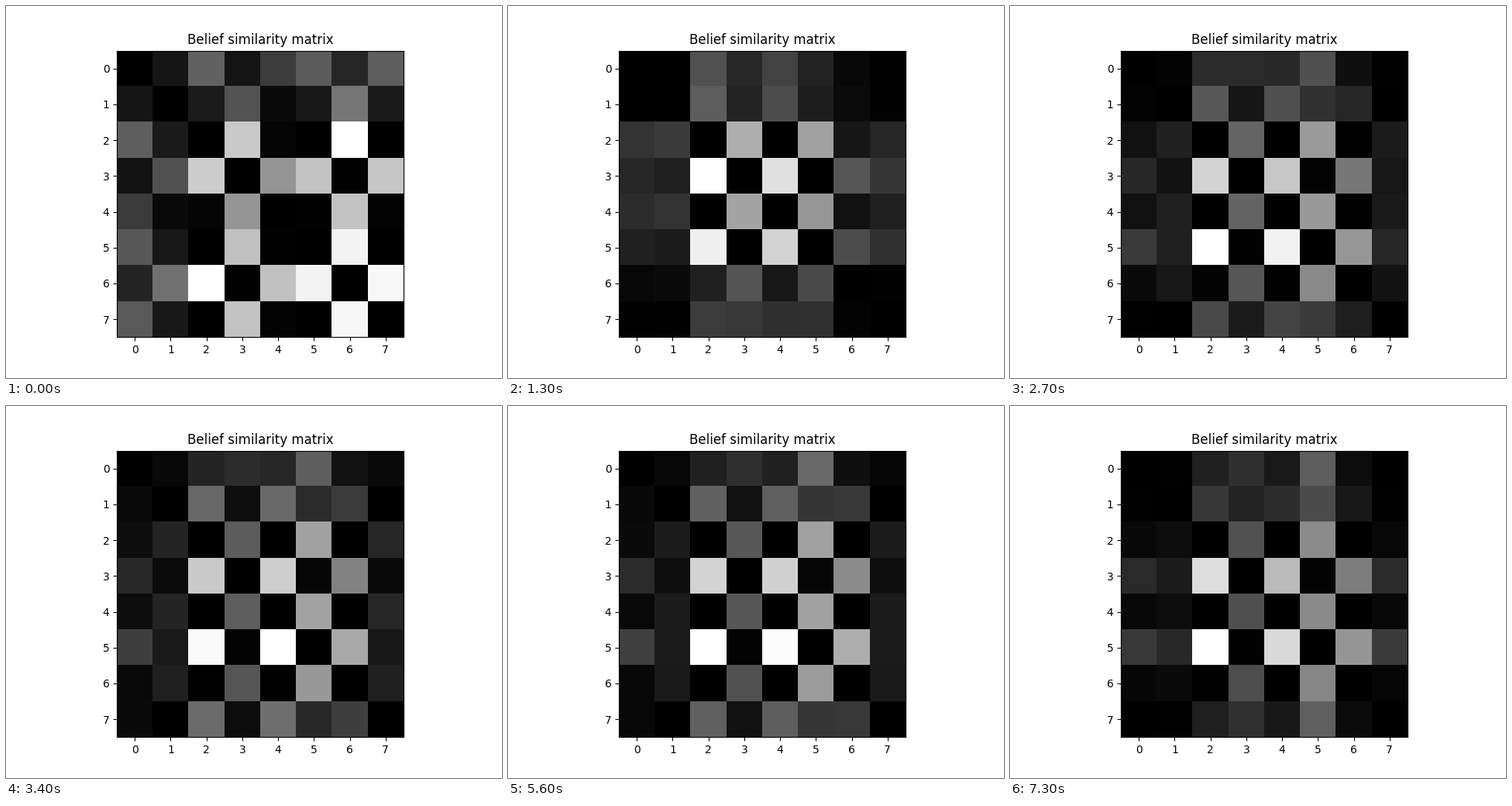
A matplotlib script for the animation above (7400 ms loop, 640 px wide and 480 px high).

```python
import numpy as np
import matplotlib.pyplot as plt
from matplotlib.animation import FuncAnimation

FRAMES = 74
PAUSE = 47      # step that is held for one extra frame
PERIOD = 26     # steps per swing of the undecided agents

# Log-odds of the eight agents: where they begin, where they settle,
# and how strongly they swing on the way
START = np.array([-.13, .26, .71, -.51, .53, .68, -.66, .69])
SETTLE = np.array([1.38, .40, 6.42, -1.89, 5.95, -3.63, 4.13, .65])
SWING = np.array([.04, .47, .58, -.12, 0, 0, 0, .83])


def beliefs_at(frame):
    step = frame - (frame > PAUSE)
    ease = 1 - np.exp(-(step / 22) ** 1.5)
    sway = -np.sin(2 * np.pi * step / PERIOD)
    x = START + (SETTLE - START) * ease + SWING * sway
    return 1 / (1 + np.exp(-x))


def divergence(b):
    """Pairwise KL divergence of binary beliefs, scaled to a maximum of 1."""
    p, q = b[:, None], b[None, :]
    d = p * np.log(p / q) + (1 - p) * np.log((1 - p) / (1 - q))
    return d / d.max()


fig, ax = plt.subplots(figsize=(6.4, 4.8), dpi=100)
image = ax.imshow(divergence(beliefs_at(0)), cmap="gray", vmin=0, vmax=1)
ax.set_title("Belief similarity matrix")


def update(frame):
    image.set_data(divergence(beliefs_at(frame)))
    return [image]


anim = FuncAnimation(fig, update, frames=FRAMES, interval=100,
                     repeat=True, repeat_delay=0)
plt.show()
```
